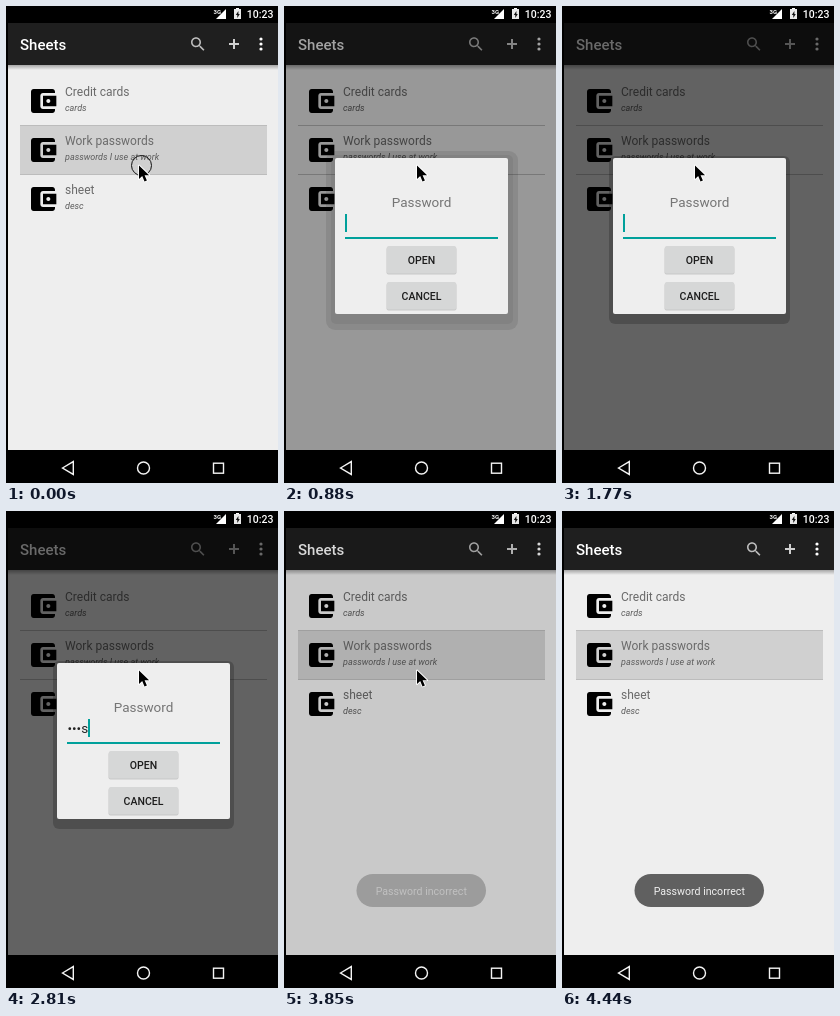
Animation, 272 px wide and 477 px high, one loop 4.86 s. Source, as an HTML page with a canvas:

```html
<!DOCTYPE html>
<html lang="en">
<head>
<meta charset="utf-8">
<title>Password dialog</title>
<style>
  html, body { margin: 0; width: 100%; height: 100%; overflow: hidden; background: #000; }
  canvas { display: block; width: 272px; height: 477px; }
</style>
</head>
<body>
<canvas id="stage"></canvas>
<script>
const W = 272, H = 477, LOOP = 4860;
const TEAL = '#00a09b';
const canvas = document.getElementById('stage');
const ratio = window.devicePixelRatio || 1;
canvas.width = W * ratio;
canvas.height = H * ratio;
const ctx = canvas.getContext('2d');

const WALLET = new Path2D('M21 18v1c0 1.1-.9 2-2 2H5c-1.11 0-2-.9-2-2V5c0-1.1.89-2 2-2h14c1.1 0 2 .9 2 2v1h-9c-1.11 0-2 .9-2 2v8c0 1.1.89 2 2 2h9zm-9-2h10V8H12v8zm4-2.5c-.83 0-1.5-.67-1.5-1.5s.67-1.5 1.5-1.5 1.5.67 1.5 1.5-.67 1.5-1.5 1.5z');
const SEARCH = new Path2D('M15.5 14h-.79l-.28-.27C15.41 12.59 16 11.11 16 9.5 16 5.91 13.09 3 9.5 3S3 5.91 3 9.5 5.91 16 9.5 16c1.61 0 3.09-.59 4.23-1.57l.27.28v.79l5 4.99L20.49 19l-4.99-5zm-6 0C7.01 14 5 11.99 5 9.5S7.01 5 9.5 5 14 7.01 14 9.5 11.99 14 9.5 14z');
const ARROW = new Path2D('M.5 .5V14L3.7 11 6 16.4 8.4 15.4 6.1 10.2H10.6z');
const BOLT = new Path2D('M232.4 5L229.8 9H231.3V12L233.8 7.9H232.4z');

const ROWS = [
  ['Credit cards', 'cards'],
  ['Work passwords', 'passwords I use at work'],
  ['sheet', 'desc']
];

// Last value in [time, value] steps that has been reached.
function at(steps, t) {
  let value = steps[0][1];
  for (const [start, v] of steps) if (t >= start) value = v;
  return value;
}

function text(str, x, y, font, color, align = 'left') {
  ctx.font = font + ' Roboto, sans-serif';
  ctx.fillStyle = color;
  ctx.textAlign = align;
  ctx.fillText(str, x, y);
}

function rect(x, y, w, h, color) {
  ctx.fillStyle = color;
  ctx.fillRect(x, y, w, h);
}

function round(x, y, w, h, r, color) {
  ctx.fillStyle = color;
  ctx.beginPath();
  ctx.roundRect(x, y, w, h, r);
  ctx.fill();
}

function circle(x, y, r) {
  ctx.beginPath();
  ctx.arc(x, y, r, 0, Math.PI * 2);
}

function icon(path, x, y, scale, color) {
  ctx.save();
  ctx.translate(x, y);
  ctx.scale(scale, scale);
  ctx.fillStyle = color;
  ctx.fill(path);
  ctx.restore();
}

function poly(points, close) {
  ctx.beginPath();
  points.forEach(([x, y]) => ctx.lineTo(x, y));
  if (close) ctx.closePath();
}

function statusBar() {
  ctx.fillStyle = '#fff';
  poly([[220, 3], [220, 13], [210, 13]], true);
  ctx.fill();
  text('3G', 207.5, 7.5, '700 6px', '#fff');
  rect(230, 2, 3, 2, '#fff');
  rect(228, 3, 7, 10, '#e8e8e8');
  icon(BOLT, 0, 0, 1, '#111');
  text('10:23', 240.7, 12, '500 10.5px', '#fff');
}

function appBar() {
  rect(2, 17, 270, 42, '#1f1f1f');
  text('Sheets', 14, 43.5, '500 15px', '#fff');
  icon(SEARCH, 182.7, 29, 0.77, '#bdbdbd');
  rect(223, 37, 10, 2, '#cfcfcf');
  rect(227, 33, 2, 10, '#cfcfcf');
  ctx.fillStyle = '#fff';
  for (const y of [33, 38, 43]) {
    circle(255, y, 1.6);
    ctx.fill();
  }
  const shade = ctx.createLinearGradient(0, 59, 0, 64);
  shade.addColorStop(0, 'rgba(0,0,0,.3)');
  shade.addColorStop(1, 'rgba(0,0,0,0)');
  rect(2, 59, 270, 5, shade);
}

function list(selected) {
  if (selected) rect(14, 119, 247, 50, '#d0d0d0');
  rect(14, 119, 247, 1, '#bcbcbc');
  rect(14, 168, 247, 1, '#bcbcbc');
  ROWS.forEach(([title, note], i) => {
    const y = i * 49;
    icon(WALLET, 21, 79 + y, 4 / 3, '#000');
    text(title, 59, 90 + y, '400 12px', '#6a6a6a');
    text(note, 59, 105 + y, 'italic 400 9px', '#5c5c5c');
  });
}

function navBar() {
  rect(0, 444, W, 33, '#000');
  ctx.strokeStyle = '#f4f4f4';
  ctx.lineWidth = 1.4;
  poly([[56.5, 462], [67.3, 455.6], [67.3, 468.4]], true);
  ctx.stroke();
  circle(137.5, 462, 6);
  ctx.stroke();
  ctx.strokeRect(207.5, 457.2, 10, 10);
}

function button(label, y, color, lift) {
  round(102.5, y + 1, 70, 27.5 + lift, 2, `rgba(0,0,0,${0.16 + lift * 0.06})`);
  round(103, y, 69, 27.5, 1.5, color);
  text(label, 137.5, y + 18, '500 10.5px', '#1c1c1c', 'center');
}

function dialog(t) {
  if (t < 1030) {
    round(42, 145, 192, 179, 9, 'rgba(0,0,0,.09)');
    round(47, 149, 182, 169, 5, 'rgba(0,0,0,.06)');
  } else {
    round(47, 150, 181, 168, 6, 'rgba(0,0,0,.2)');
  }
  round(51, 152, 173, 156, 2, '#eee');
  text('Password', 137.5, 201, '400 13.5px', '#757575', 'center');

  const typed = at([[0, ''], [2360, 'p'], [2510, '•a'], [2660, '••s'], [2810, '•••s'], [3250, '••••']], t);
  text(typed, 61.5, 222, '400 13.5px', '#212121');
  const caret = at([[0, true], [1320, false], [1770, true], [3250, false]], t);
  if (caret) rect(61 + Math.round(ctx.measureText(typed).width), 208, 2, 18, TEAL);

  if (t < 3250) rect(61, 231, 153, 2, TEAL);
  else if (t < 3400) rect(61, 231, 153, 1.5, '#4a9390');
  else rect(61, 231, 153, 1, '#868686');

  const fill = at([[0, '#d6d7d7'], [3250, '#c7c8c8'], [3700, '#b9bbba']], t);
  button('OPEN', 240, fill, t >= 3700 ? 1 : 0);
  button('CANCEL', 276, '#d6d7d7', 0);
}

function toast(alpha) {
  ctx.globalAlpha = alpha;
  round(72.5, 363, 129.5, 33, 16.5, '#606060');
  text('Password incorrect', 137.3, 383.5, '400 10.6px', '#f0f0f0', 'center');
  ctx.globalAlpha = 1;
}

function pointer(t) {
  const pressed = t < 140 || (t >= 590 && t < 740);
  if (pressed) {
    ctx.strokeStyle = '#111';
    ctx.lineWidth = 1;
    circle(135.5, 159.5, 10);
    ctx.stroke();
  }
  const spot = at([[0, [132.5, 159]], [4290, [208.5, 451]], [4440, null]], t);
  if (!spot) return;
  ctx.save();
  ctx.translate(...spot);
  ctx.lineJoin = 'round';
  ctx.lineWidth = 1.8;
  ctx.strokeStyle = '#fff';
  ctx.stroke(ARROW);
  ctx.fillStyle = '#000';
  ctx.fill(ARROW);
  ctx.restore();
}

function draw(t) {
  const open = t >= 880 && t < 3850;
  const dim = at([[0, 0], [880, 0.365], [1030, 0.59], [3850, 0.155], [3990, 0]], t);
  const toastAlpha = at([[0, 0], [3850, 0.43], [3990, 0.88], [4140, 1]], t);

  ctx.setTransform(ratio, 0, 0, ratio, 0, 0);
  rect(0, 0, W, H, '#000');
  statusBar();
  rect(2, 59, 270, 385, '#eee');
  appBar();
  list(!open);
  if (dim) rect(2, 17, 270, 427, `rgba(0,0,0,${dim})`);
  navBar();
  if (open) dialog(t);
  if (toastAlpha) toast(toastAlpha);
  pointer(t);
}

const begin = performance.now();
function tick() {
  draw((performance.now() - begin) % LOOP);
  requestAnimationFrame(tick);
}
tick();
</script>
</body>
</html>
```
